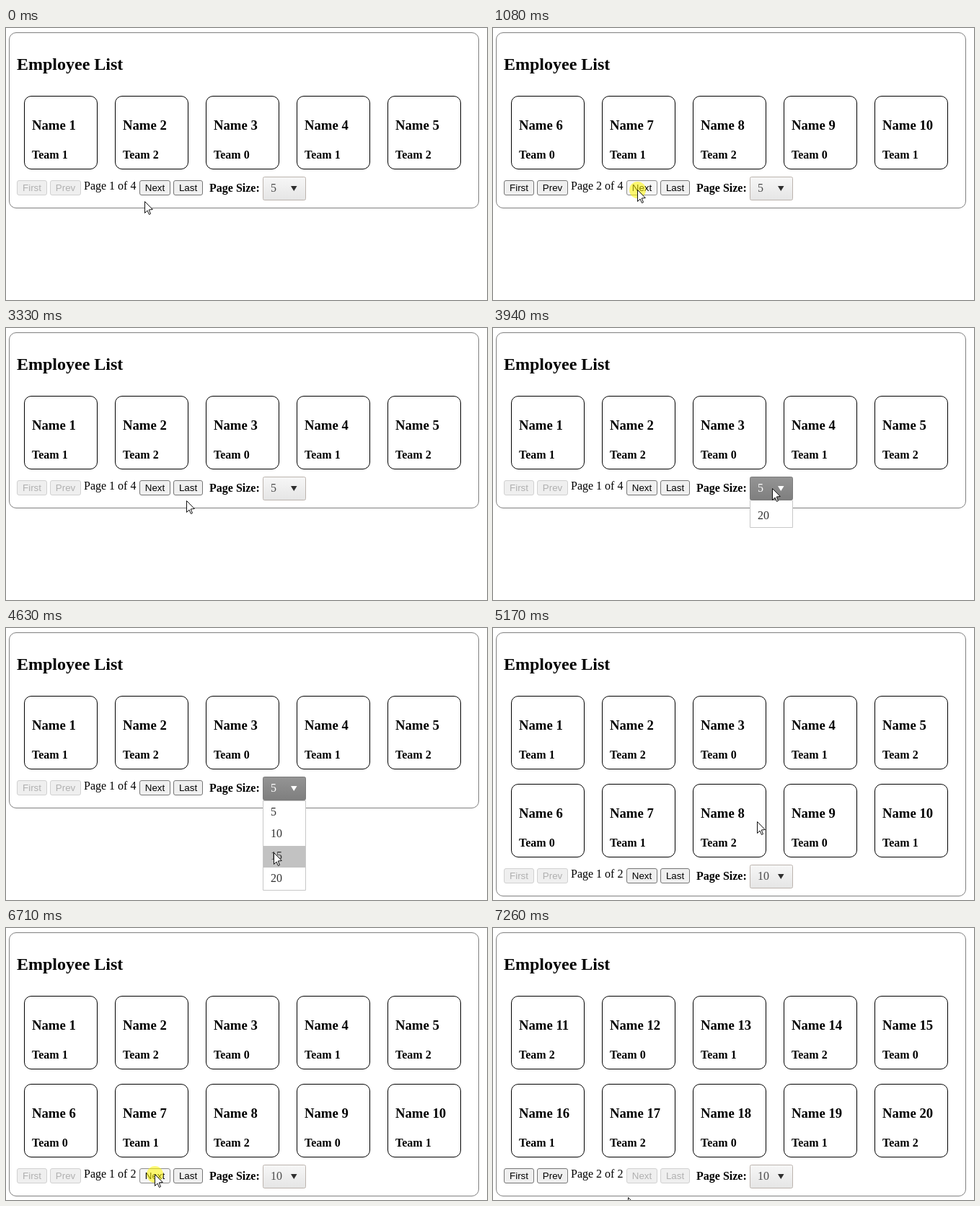
These frames come from a looping animation (667x377 px, 7.58 s). An HTML page with a canvas:

```html
<!DOCTYPE html>
<html lang="en">
<head>
<meta charset="utf-8">
<title>Employee List</title>
<style>
html, body { margin: 0; width: 100%; height: 100%; overflow: hidden; background: #fff; }
canvas { display: block; }
</style>
</head>
<body>
<canvas id="stage" width="667" height="377"></canvas>
<script>
// The loop runs in 98 equal steps; all times below count steps.
const LOOP = 7580, STEPS = 98, LEAD = 22, HOLD = 2;
const ctx = document.getElementById('stage').getContext('2d');
const SERIF = '"Liberation Serif", "Times New Roman", serif';
const SANS = '"Liberation Sans", Arial, sans-serif';
const SIZES = [5, 10, 15, 20];

// Pointer moves: start, end, target x and y, bow of the path
const moves = [
  [0, 4, 200, 224, 0],
  [32, 37.5, 37, 221, 8],
  [40, 48, 387, 222, 18],
  [52, 60, 371, 311, 0],
  [61, 63, 376, 287, 0],
  [66, 71, 349, 234, 0],
  [77, 78, 327, 265, 0],
  [78, 86, 206, 341, 0],
  [90, 94, 187, 373, 0]
];

// Clicks take effect when the button is released
const next = s => s.page++;
const first = s => s.page = 1;
const open = (s, at) => s.opened = at;
const pickTen = (s, at) => { s.size = 10; s.page = 1; s.closed = at; };
const clicks = [[4, next], [14, next], [23, next], [39, first], [49, open], [64, pickTen], [87, next]];

function pointerAt(step) {
  let x = 192, y = 240;
  for (const [from, to, tx, ty, bow] of moves) {
    if (step <= from) break;
    const k = 1 - (1 - Math.min(1, (step - from) / (to - from))) ** 2;
    x += (tx - x) * k;
    y += (ty - y) * k + bow * Math.sin(Math.PI * k);
  }
  return { x: Math.round(x), y: Math.round(y) };
}

function stateAt(step) {
  const s = { size: 5, page: 1, opened: Infinity, closed: Infinity, pressed: false };
  for (const [at, act] of clicks) {
    if (step >= at + HOLD) act(s, at + HOLD);
    else if (step >= at) s.pressed = true;
  }
  return s;
}

// Share of the drop-down list that has slid into view
function listShare(step, { opened, closed }) {
  if (step < opened) return 0;
  if (step >= closed) return step > closed ? 0 : .5;
  return 1 - (1 - Math.min(1, (step - opened + .3) / 2.6)) ** 3;
}

const within = (p, x, y, w, h) => p.x >= x && p.x < x + w && p.y >= y && p.y < y + h;

function text(str, x, y, font, color = '#000', align = 'left') {
  ctx.font = font;
  ctx.fillStyle = color;
  ctx.textAlign = align;
  ctx.fillText(str, x, y);
}

function box(x, y, w, h, r, stroke, fill = '#fff') {
  ctx.beginPath();
  ctx.roundRect(x + .5, y + .5, w - 1, h - 1, r);
  ctx.fillStyle = fill;
  ctx.fill();
  ctx.strokeStyle = stroke;
  ctx.stroke();
}

function polygon(points, fill, stroke = 'transparent') {
  ctx.beginPath();
  points.forEach(([x, y]) => ctx.lineTo(x, y));
  ctx.closePath();
  ctx.fillStyle = fill;
  ctx.fill();
  ctx.strokeStyle = stroke;
  ctx.stroke();
}

function button(label, x, y, w, enabled, pos, pressed) {
  let border = '#767676', fill = '#efefef', color = '#000';
  if (!enabled) {
    border = '#d1d1d1';
    color = '#b0b0b0';
  } else if (within(pos, x, y, w, 21)) {
    border = pressed ? '#8d8d8d' : '#4f4f4f';
    fill = pressed ? '#f5f5f5' : '#e5e5e5';
  }
  box(x, y, w, 21, 2.5, border, fill);
  text(label, x + w / 2, y + 15, '13.333px ' + SANS, color, 'center');
}

// Returns whether the pointer is over the name
function card(n, x, y, pos) {
  box(x, y, 102, 102, 9.5, '#000');
  text('Name ' + n, x + 11, y + 47, 'bold 18.72px ' + SERIF);
  text('Team ' + n % 3, x + 11, y + 87, 'bold 16px ' + SERIF);
  return within(pos, x + 11, y + 30, 64, 22);
}

function picker(value, y, active) {
  const fill = ctx.createLinearGradient(0, y, 0, y + 33);
  fill.addColorStop(0, active ? '#959595' : '#f7f7f7');
  fill.addColorStop(1, active ? '#7e7e7e' : '#e5e5e5');
  box(356, y, 60, 33, 2, active ? '#7b7b7b' : '#bcb4ae', fill);
  text(value, 367, y + 21, '16px ' + SERIF, active ? '#fff' : '#4c4c4c');
  polygon([[395, y + 13], [403.5, y + 13], [399.25, y + 20]], active ? '#fff' : '#2e2e2e');
}

function list(share, pos) {
  if (!share) return;
  const height = Math.round(125 * share);
  ctx.save();
  ctx.beginPath();
  ctx.rect(356, 239, 60, height);
  ctx.clip();
  ctx.translate(0, height - 125);
  box(356, 239, 60, 125, 0, '#c8c8c8');
  SIZES.forEach((size, i) => {
    const top = Math.round(240.5 + 30.7 * i);
    if (share === 1 && within(pos, 357, top, 58, 30)) {
      ctx.fillStyle = '#c2c2c2';
      ctx.fillRect(357, top, 58, 30);
    }
    text(size, 367, top + 19, '16px ' + SERIF, '#333');
  });
  ctx.restore();
}

function halo({ x, y }) {
  ctx.beginPath();
  ctx.arc(x + .5, y + .5, 11.5, 0, 7);
  ctx.fillStyle = 'rgba(255, 245, 0, .55)';
  ctx.fill();
}

function arrow({ x, y }) {
  const shape = [[.5, .5], [.5, 16.5], [4, 13], [6.5, 18.5], [8.5, 17.5], [6.2, 12], [11.3, 11.5]];
  polygon(shape.map(([a, b]) => [x + a, y + b]), '#fff', '#111');
}

function beam({ x, y }) {
  ctx.fillStyle = '#222';
  ctx.fillRect(x, y - 5, 1, 12);
  for (const end of [y - 6, y + 7]) {
    ctx.fillRect(x - 3, end, 3, 1);
    ctx.fillRect(x + 1, end, 3, 1);
  }
}

function draw(step) {
  const pos = pointerAt(step), state = stateAt(step);
  const { size, page, pressed, opened, closed } = state;
  const pages = 20 / size, bar = 89 + 122 * size / 5;
  let overText = false;

  ctx.fillStyle = '#fff';
  ctx.fillRect(0, 0, 667, 377);
  box(4, 6, 652, bar + 33, 9.5, '#808080');
  text('Employee List', 15, 58, 'bold 24px ' + SERIF);
  for (let i = 0; i < size; i++) {
    const n = (page - 1) * size + i + 1;
    if (card(n, 25 + i % 5 * 126, 94 + Math.floor(i / 5) * 122, pos)) overText = true;
  }

  button('First', 15, bar, 42, page > 1, pos, pressed);
  button('Prev', 61, bar, 43, page > 1, pos, pressed);
  text(`Page ${page} of ${pages}`, 108, bar + 13, '16px ' + SERIF);
  button('Next', 185, bar, 43, page < pages, pos, pressed);
  button('Last', 232, bar, 41, page < pages, pos, pressed);
  text('Page Size:', 282, bar + 16, 'bold 16px ' + SERIF);
  picker(size, bar - 5, step >= opened && step < closed);
  list(listShare(step, state), pos);
  if (pressed) halo(pos);
  (overText ? beam : arrow)(pos);
}

const start = performance.now();
(function loop() {
  const t = (performance.now() - start) % LOOP;
  draw(Math.min(STEPS - 1, Math.floor((t + LEAD) * STEPS / LOOP)));
  requestAnimationFrame(loop);
})();
</script>
</body>
</html>
```
